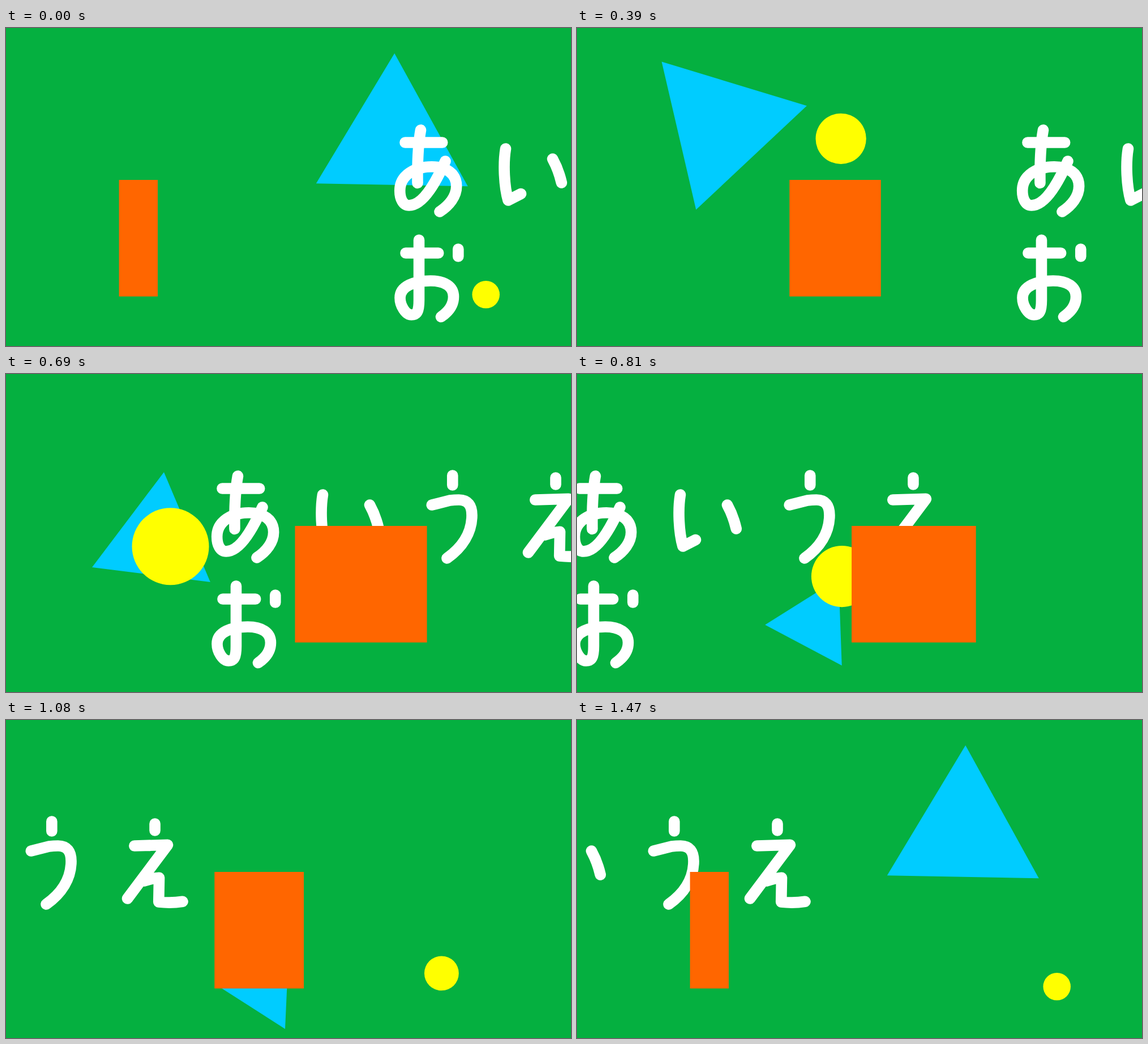
Recreate the animation shown at these times as an HTML page. Size 998 by 561 pixels, loop 1500 ms.

```html
<!DOCTYPE html>
<html lang="ja">
<head>
<meta charset="utf-8">
<title>Shapes</title>
<style>
  html, body { margin: 0; width: 100%; height: 100%; overflow: hidden; background: #05b040; }
  svg { display: block; width: 998px; height: 561px; }
  #text { fill: none; stroke: #fff; stroke-width: 19.6; stroke-linecap: round; stroke-linejoin: round; }
</style>
</head>
<body>
<svg viewBox="0 0 998 561">
  <path id="tri" d="M0-116L134 116H-134Z" fill="#0cf"/>
  <g id="text" role="img" aria-label="あいうえお">
    <!-- あ -->
    <path d="M705 202H770.7M732.5 180C728 205 726.5 235 727 273.5"/>
    <path d="M776 235C762 266 738 313 712 313C701 313 695.7 301 695.7 287C695.7 259 723 244.8 752 244.8C778 244.8 795.7 257 795.7 279C795.7 297 783 313 766 324"/>
    <!-- い -->
    <path d="M882.5 213C878 240 880 280 887 304L909.5 292.5M965.5 231Q976 250 981.3 273"/>
    <!-- お -->
    <path d="M706 397H763.7M798.8 390V403"/>
    <path d="M729.5 374V480C729.5 500 726 506 716 506C706 506 696 490 696 476C696 455 722 446 750 446C775 446 790.5 456 790.5 474C790.5 490 781 501 768.5 509.5"/>
    <g transform="translate(940)">
      <!-- う -->
      <path d="M171.8 179V196M135.3 231L167 223Q175 222 183 222C199 222 206 232 206 249C206 280 189 306 162 325"/>
      <!-- え -->
      <path d="M354 183V195M317.8 222L376.5 220.3L305.5 315M335 284Q350 279 361.5 278.3L360.7 321Q382 323.5 403 320.3"/>
    </g>
  </g>
  <circle id="dot" fill="#ff0"/>
  <rect id="box" y="268" height="205.6" fill="#f60"/>
</svg>
<script>
const STEP = 30, FRAMES = 50;
const [tri, text, dot, box] = ['tri', 'text', 'dot', 'box'].map(id => document.getElementById(id));

const linear = t => t;
const inQuad = t => t * t;
const outCubic = t => 1 - (1 - t) ** 3;
const outQuart = t => 1 - (1 - t) ** 4;
const inOutBack = t => {
  const c = 1.70158 * 1.525;
  const half = u => u * u * ((c + 1) * u - c) / 2;
  return t < .5 ? half(2 * t) : 1 - half(2 - 2 * t);
};
const outBounce = t => {
  const k = 7.5625, d = 2.75;
  if (t < 1 / d) return k * t * t;
  if (t < 2 / d) return k * (t - 1.5 / d) ** 2 + .75;
  if (t < 2.5 / d) return k * (t - 2.25 / d) ** 2 + .9375;
  return k * (t - 2.625 / d) ** 2 + .984375;
};

// Each key: frame, values, easing towards the next key.
const tracks = {
  // x, y, angle, scale
  tri: [
    [0, [684, 160.8, 1.1, 1], linear],
    [18, [142.5, 164.7, 106.06, 1], outBounce],
    [39, [482.3, 508.4, 155.1, .499], linear],
    [49, [684, 160.8, 1.1, 1]]
  ],
  // x
  text: [[0, [0], inOutBack], [49, [-940]]],
  // x, y, radius
  dot: [
    [0, [847.7, 470.2, 24.3], inQuad],
    [12, [539.3, 150, 34.9], outQuart],
    [24, [290.5, 304.2, 68], outCubic],
    [49, [847.7, 470.2, 24.3]]
  ],
  // left, right
  box: [
    [0, [199.6, 268], linear],
    [24, [524, 764.2], linear],
    [49, [199.6, 268]]
  ]
};

function sample(keys, frame) {
  const n = Math.max(1, keys.findIndex(key => key[0] >= frame));
  const [start, from, ease] = keys[n - 1], [end, to] = keys[n];
  const e = ease((frame - start) / (end - start));
  return from.map((v, i) => v + (to[i] - v) * e);
}

function draw(frame) {
  const [tx, ty, angle, scale] = sample(tracks.tri, frame);
  tri.setAttribute('transform', `translate(${tx} ${ty}) rotate(${angle}) scale(${scale})`);

  text.setAttribute('transform', `translate(${sample(tracks.text, frame)[0]})`);

  const [cx, cy, r] = sample(tracks.dot, frame);
  dot.setAttribute('cx', cx);
  dot.setAttribute('cy', cy);
  dot.setAttribute('r', r);

  const [left, right] = sample(tracks.box, frame);
  box.setAttribute('x', left);
  box.setAttribute('width', right - left);
}

let origin;
function tick(now) {
  origin ??= now;
  // Half a millisecond guards against rounding at step edges.
  draw(Math.floor((now - origin + .5) / STEP) % FRAMES);
  requestAnimationFrame(tick);
}
draw(0);
requestAnimationFrame(tick);
</script>
</body>
</html>
```
